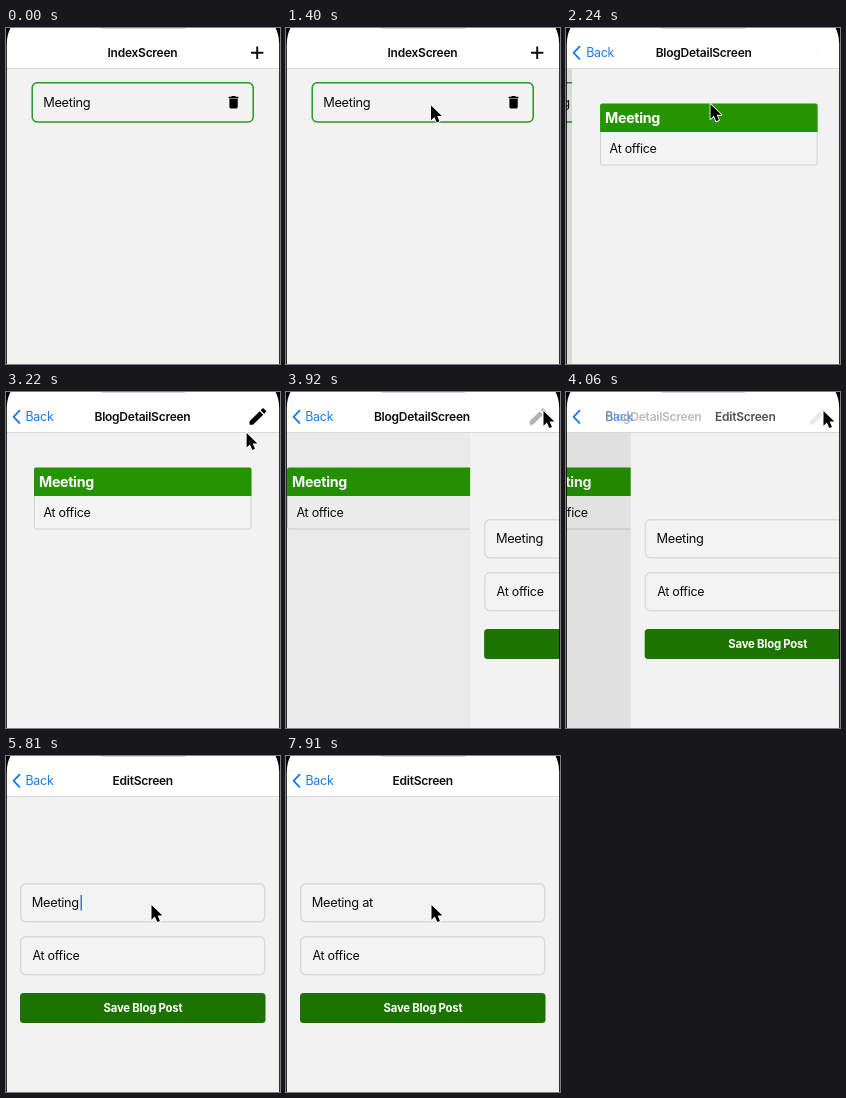
These frames come from a looping animation (274x336 px, 8000 ms). An HTML page:

```html
<!DOCTYPE html>
<html lang="en">
<head>
<meta charset="utf-8">
<title>Blog app</title>
<style>
  html, body { margin: 0; width: 100%; height: 100%; overflow: hidden; background: #f2f2f2; }
  svg { display: block; width: 274px; height: 336px; }
  text { font: 12.8px Inter, "Liberation Sans", sans-serif; letter-spacing: -.3px; fill: #0c0c0c; white-space: pre; }
  .title { font-size: 12px; font-weight: 600; letter-spacing: -.25px; }
  .back { font-size: 12.4px; letter-spacing: -.25px; fill: #1a7be8; }
  .office { font-size: 12.5px; }
  .head { font-size: 14.2px; font-weight: 700; fill: #fff; }
  .save { font-size: 11.3px; font-weight: 700; letter-spacing: -.2px; fill: #fff; text-anchor: middle; }
  .bg { fill: #f2f2f2; }
  .field { fill: #f3f3f3; stroke: #d9d9d9; stroke-width: 1.4; }
</style>
</head>
<body>
<svg viewBox="0 0 274 336">
  <g id="index">
    <rect class="bg" width="274" height="336"/>
    <rect x="26.2" y="54.7" width="221" height="39.3" rx="5" fill="none" stroke="#2a962a" stroke-width="1.5"/>
    <text x="37.2" y="79">Meeting</text>
    <path transform="translate(219.3 66) scale(.69)" d="M6 19c0 1.1.9 2 2 2h8c1.1 0 2-.9 2-2V7H6v12zM19 4h-3.5l-1-1h-5l-1 1H5v2h14V4z"/>
    <rect class="dim" width="274" height="336"/>
  </g>

  <g id="detail">
    <rect class="bg" width="274" height="336"/>
    <rect x="28.5" y="76.5" width="216.5" height="60.5" rx="2" fill="#f4f4f4" stroke="#cfcfcf"/>
    <path d="M28 104V77.500Q28 75.500 30 75.500H243.500Q245.500 75.500 245.500 77.500V104Z" fill="#249400"/>
    <text class="head" x="33" y="95">Meeting</text>
    <text class="office" x="37.500" y="125">At office</text>
    <rect class="dim" width="274" height="336"/>
  </g>

  <g id="edit">
    <rect class="bg" width="274" height="336"/>
    <rect class="field" x="14.700" y="127.700" width="244" height="38" rx="5"/>
    <text id="typed" x="25.800" y="151.300">Meeting</text>
    <rect id="caret" y="139" width="1.500" height="15.500" fill="#3477dc"/>
    <rect class="field" x="14.700" y="180.700" width="244" height="38" rx="5"/>
    <text class="office" x="26.500" y="204.300">At office</text>
    <rect x="14" y="237" width="245.500" height="30" rx="3.500" fill="#1d7300"/>
    <text class="save" x="137" y="256">Save Blog Post</text>
  </g>

  <rect width="274" height="40.500" fill="#fff"/>
  <rect y="40" width="274" height="1" fill="#d8d8d8"/>
  <rect x="95" width="84" height="1" fill="#d4d4d4"/>
  <text id="indexTitle" class="title" y="29">IndexScreen</text>
  <text id="detailTitle" class="title" y="29">BlogDetailScreen</text>
  <text id="editTitle" class="title" y="29">EditScreen</text>
  <path id="chevron" d="M13.500 18.700L7.600 24.800 13.500 30.900" fill="none" stroke="#1a7be8" stroke-width="1.900" stroke-linecap="round" stroke-linejoin="round"/>
  <text id="backOne" class="back" y="29">Back</text>
  <text id="backTwo" class="back" y="29">Back</text>
  <path id="plus" d="M245 24.800H257.400M251.200 18.600V31" stroke="#0c0c0c" stroke-width="1.900"/>
  <path id="pencil" transform="translate(240.800 13.500) scale(.92)" d="M3 17.250V21h3.750L17.810 9.940l-3.750-3.750L3 17.250zM20.710 7.040a1 1 0 0 0 0-1.410l-2.340-2.340a1 1 0 0 0-1.410 0l-1.830 1.830 3.750 3.750 1.830-1.830z"/>

  <path d="M0 0H4.500Q1 6 .8 16V336H0Z"/>
  <path d="M274 0H269.500Q273 6 273.200 16V336H274Z"/>

  <g id="cursor">
    <circle id="ring" cy="1" r="22" fill="none" stroke="#000" stroke-opacity=".55" stroke-width="1.600"/>
    <path transform="scale(1.080)" d="M0 0V13.600L3.100 10.700 5.300 15.800 7.800 14.700 5.700 9.800H10Z" stroke="#fff" stroke-width="1.600" stroke-linejoin="round" paint-order="stroke"/>
  </g>
</svg>
<script>
const $ = id => document.getElementById(id);
const LOOP = 8000, WIDTH = 274;
const PUSH_DETAIL = 1740, PUSH_EDIT = 3818;
const clamp = v => Math.max(0, Math.min(1, v));
const within = (t, a, b) => t >= a && t < b;

// Critically damped spring: share of the distance still to go.
const left = (t, w) => t <= 0 ? 1 : (1 + w * t) * Math.exp(-w * t);
const pageLeft = t => left(t, .0114);
const barLeft = t => left(t - 95, .017);

// Pointer path: time, x, y
const path = [
  [770, 162, 314], [910, 158, 240], [1080, 152, 150], [1250, 147, 94], [1400, 145, 77.5],
  [1540, 144.5, 77], [2450, 144.5, 76], [2600, 155, 98], [2780, 178, 111], [2940, 204, 92],
  [3100, 227, 57], [3220, 240.500, 41], [3290, 247.500, 36], [3500, 257.500, 19],
  [4130, 257.500, 19], [4300, 232, 46], [4480, 188, 98], [4620, 165, 124], [4690, 160, 132],
  [4900, 145.500, 149]
];
function pointAt(t) {
  const i = path.findIndex(p => p[0] > t);
  if (i === 0) return path[0].slice(1);
  if (i < 0) return path[path.length - 1].slice(1);
  const a = path[i - 1], b = path[i], k = (t - a[0]) / (b[0] - a[0]);
  return [a[1] + (b[1] - a[1]) * k, a[2] + (b[2] - a[2]) * k];
}

// Typing: time, text, caret position
const typing = [
  [0, "Meeting", 71.500], [5670, "Meeting ", 74.500], [6720, "Meeting a", 82],
  [6930, "Meeting at", 85.700], [7140, "Meeting at ", 88.500]
];

function place(id, x, opacity = 1) {
  $(id).setAttribute("transform", `translate(${x.toFixed(2)} 0)`);
  $(id).setAttribute("opacity", opacity.toFixed(3));
}

function draw(t) {
  const p1 = pageLeft(t - PUSH_DETAIL), p2 = pageLeft(t - PUSH_EDIT);
  const b1 = barLeft(t - PUSH_DETAIL), b2 = barLeft(t - PUSH_EDIT);

  place("index", -.3 * WIDTH * (1 - p1));
  place("detail", WIDTH * p1 - .3 * WIDTH * (1 - p2));
  place("edit", WIDTH * p2);
  const dims = document.querySelectorAll(".dim");
  dims[0].setAttribute("opacity", .1 * (1 - p1));
  dims[1].setAttribute("opacity", .1 * (1 - p2));

  place("indexTitle", 20 + 81.500 * b1, b1);
  place("detailTitle", 88.500 + 150 * b1 - 68.500 * (1 - b2), (1 - b1) * b2);
  place("editTitle", 106.500 + 150 * b2, 1 - b2);
  place("backOne", 19.500 + 82 * b1 - 30 * (1 - b2), (1 - b1) * clamp(2 * b2 - 1));
  place("backTwo", 19.500 + 69 * b2, 1 - b2);
  $("chevron").setAttribute("opacity", 1 - b1);
  $("plus").setAttribute("opacity", b1);
  $("pencil").setAttribute("opacity", clamp((t - 2280) / 120) * (t < 3640 ? 1 : .3) * b2);

  const step = typing.filter(s => s[0] <= t).pop();
  $("typed").textContent = step[1];
  $("caret").setAttribute("x", step[2]);
  const blink = t < 6720 ? clamp((6500 - t) / 240) : clamp((7900 - t) / 90);
  $("caret").setAttribute("opacity", t < 5320 ? 0 : blink);

  const [x, y] = pointAt(t);
  $("cursor").setAttribute("transform", `translate(${x} ${y})`);
  $("cursor").setAttribute("visibility", t < 770 ? "hidden" : "visible");
  const pressed = within(t, 1680, 1750) || within(t, 3640, 3710) || within(t, 5040, 5180);
  $("ring").setAttribute("opacity", pressed ? 1 : 0);
}

const start = performance.now();
function tick() {
  draw((performance.now() - start) % LOOP);
  requestAnimationFrame(tick);
}
tick();
</script>
</body>
</html>
```
